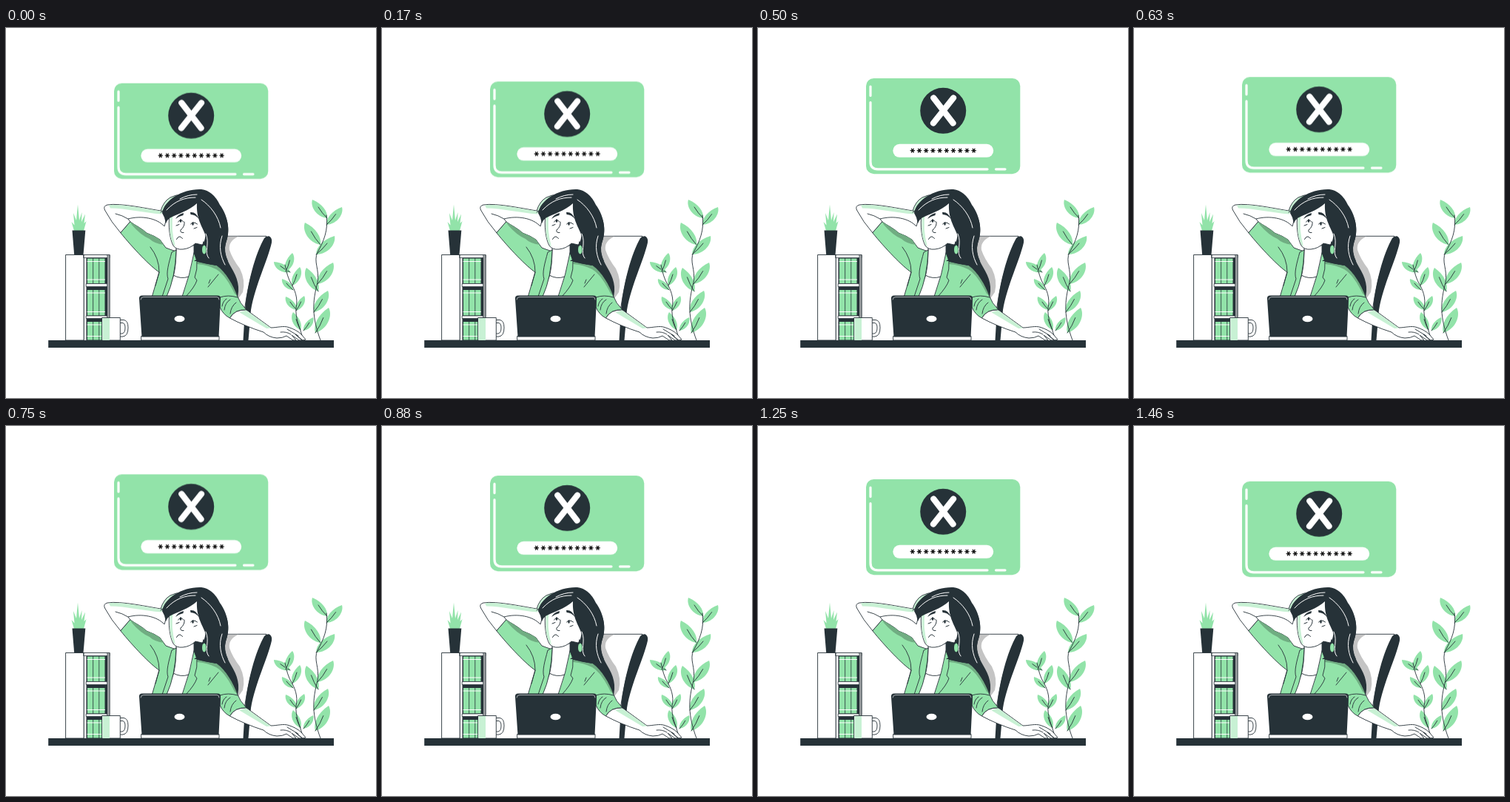
An HTML page for the animation above (1500 ms loop, 500 by 500 pixels).

```html
<!DOCTYPE html>
<html lang="en">
<head>
<meta charset="utf-8">
<title>Wrong password</title>
<style>
  html, body { margin: 0; width: 100%; height: 100%; overflow: hidden; background: #fff; }
  svg { display: block; width: 100%; height: 100%; }
  .g { fill: #92e3a9; }
  .d { fill: #263238; }
  .w { fill: #fff; }
  .t { fill: #c8f1d4; }
  .s { fill: #70ad82; }
  .o { stroke: #263238; stroke-width: .9; stroke-linejoin: round; stroke-linecap: round; }
  .l { fill: none; stroke: #263238; stroke-width: .9; stroke-linecap: round; stroke-linejoin: round; }
  .h { fill: none; stroke: #fff; stroke-width: 1; stroke-linecap: round; }
  .c { fill: none; stroke: #fff; stroke-width: 3.2; stroke-linecap: round; }
</style>
</head>
<body>
<svg viewBox="0 0 500 500" xmlns="http://www.w3.org/2000/svg">
  <g id="card">
    <rect class="g" x="146" y="75" width="208.3" height="129.2" rx="10.5"/>
    <path class="c" d="M152 86V98.500M152 107.500V188Q152 197.800 162 197.800H310M321.500 197.800H334"/>
    <circle class="d" cx="250.200" cy="118.800" r="31"/>
    <path class="c" style="stroke-width:8.200" d="M237.300 101.500L263.500 135.500M264 101.500L237 135.500"/>
    <rect class="w" x="182.300" y="163.800" width="135.900" height="18" rx="9"/>
    <path id="stars" class="l" style="stroke-width:1.400;stroke:#111"/>
  </g>

  <g id="chair">
    <path class="w o" d="M296 281.300H352C346 292 335 318 329 345Q325 362 322 382H300Z"/>
    <path fill="#c4c4c4" d="M296 281.700H314Q300 288 302 300Q306 312 316 325Q324 341 320 357L313 367L296 330Z"/>
    <path class="d" d="M349 284Q352 280.800 356 281.500Q360 284 359 290C354 313 337 347 331 381L327.500 422H320.500L323 381C326 345 337 305 349 284Z"/>
  </g>

  <g id="plants"></g>

  <g id="shelf">
    <rect class="w o" x="81" y="306.500" width="59" height="115.500"/>
    <rect class="d" x="105" y="307" width="33" height="115"/>
    <path class="w" d="M105.500 307H108.500V422H105.500Z"/>
    <g id="books"></g>
    <path class="w o" d="M105 306.500H140V310.500H105ZM108.500 345.500H137V349.500H108.500ZM108.500 389H137V392.500H108.500Z" style="stroke-width:.7"/>
    <path fill="#9b9fa1" class="o" d="M137 306.500H140V422H137Z" style="stroke-width:.6"/>
    <path class="l" d="M105.200 307V422"/>
    <path class="g" d="M92 274L88.500 262L92.500 266.500L91 250L95 260L97 238.500L99 260L102.500 249L102 262L107 251.500L105.500 264L108.500 261L105 274Z"/>
    <path class="d" d="M89.500 273.500H107.300L104.500 306.500H92.200Z"/>
    <path class="w o" d="M153 394.500H159Q165 395 165 405Q165 416 158 417H153V413H157Q161 412 161 405Q161 398.500 157 398.500H153Z"/>
    <path class="w o" d="M130 391.500H154.300V422H130Z"/>
    <path class="t" d="M130.500 392H140V422H130.500Z"/>
  </g>

  <g id="woman">
    <path class="d" d="M252 238L290 242C303 262 302 277 297 291C294 301 297 311 304 323C313 338 317 350 312 368C303 356 298 338 285 322L252 315Z"/>

    <path class="t o" d="M209 247Q213 234 222 229Q230 224.500 238 226L222 248Z"/>
    <path class="w o" d="M212 247.500C192 244.500 155 236 137 239Q131 240.500 133.500 246Q142 262 155 277L168 262L165 258C183 253 204 257 214 268L220 247Z"/>
    <path class="t" d="M139 239.500C157 237 192 245 212 248L210 251.500C187 250 162 243.500 141 243.500Z"/>
    <path class="l" d="M148 251Q157 253 165 258M209 249Q215 246 219 243"/>

    <path class="g o" d="M168 262C175 267 184 271 190 277Q201 281 208 286L216 297Q221 299 230 302L254 304L255 315Q270 319 285 321C298 331 307 348 312 361Q316 372 325 381Q309 380 302.500 392Q293 387 289 377V364H197L207 330C195 322 172 298 155 277Z"/>
    <path class="s" d="M168 262C175 267 184 271 190 277Q201 281 208 286L213 293Q200 291 194 285Q182 280 170 266Z"/>
    <path class="s" d="M256 315.500Q270 319 285 321.500C298 331 307 348 312 361L309 359C302 345 295 333 284 326Q272 320 258 319Z"/>
    <path class="l" d="M195 296Q207 311 207 330L202 348M287 333L273 350M276 340L274 345M289 364Q300 360 313 364M295 381Q296 371 303 367M303 386Q304 376 311 371M292 376Q293 369 298 366"/>

    <path class="w o" d="M230 297C230 312 229 325 226 336L216 363H240Q249 347 254 313V294Z"/>
    <path class="l" d="M226 334Q236 340 247 336"/>
    <path class="g o" d="M230 300L224 303C220 318 216 331 219 339L211 363H217Q229 337 230 300Z"/>
    <path class="g o" d="M254 304Q249 333 238 363H243Q255 350 258 341L255 337Q259 326 258 315Z"/>

    <path class="w o" d="M221 251C219 267 221 285 226 294Q230 300 239 299Q249 298 256 291L265 293Q270 288 270 278L260 235Z"/>
    <path class="t" d="M221.500 252L226 250Q222 270 229 296Q223 290 221.500 277Z"/>
    <path class="l" d="M241 262Q242 268 236 273Q235 277 240 276.500M230.500 285.500Q234 278.500 238.500 284.500M232.500 262Q236 257.500 239.500 261.500M249.500 265Q253 260.500 258.500 265M230 267L234 265.500M254 271L258 269.500" style="stroke-width:1"/>
    <path class="d" d="M229 258Q232 252 240 250L239.500 253Q233 254.500 229 258ZM249 249Q257 248 260.500 258Q256 252 249.500 252Z"/>
    <ellipse class="d" cx="236" cy="260.500" rx="1.300" ry="2.200"/>
    <ellipse class="d" cx="252.500" cy="264.500" rx="1.300" ry="2.200"/>

    <path class="d" d="M211 250C214 232 239 217 264 218Q280 220 289 239C301 255 303 276 297 291Q294 302 300 315L254 315Q264 309 267 300Q271 291 270 281C264 266 257 257 258 237C247 247 232 251 221 257Q217 260 216 264L214 256Z"/>
    <path class="h" d="M217 246C229 233 242 229 256 229M235 231Q246 225 258 225M264 232C276 240 287 254 290 270M270 278C276 291 267 303 274 311M292 281C287 295 290 309 296 320"/>
    <ellipse class="g" cx="267.800" cy="299.500" rx="2.800" ry="6"/>
    <path class="l" d="M266.500 289V294"/>

    <path class="w o" d="M325 381L358 405C366 405 375 402 382 404.500Q393 408 399 414L405 421L401 422L391 414L400 422H396L386 415L392 422H388L379 416Q374 419 366 419Q355 418 348 411Q323 403 302.500 392Q309 380 325 381Z"/>
    <path class="t" d="M324.500 381.500L358 405.500L352 406L315 384Z"/>
    <path class="l" d="M371 411Q379 410 385 414M380 407L395 416"/>
  </g>

  <g id="laptop">
    <path class="w o" d="M183 416.500H288V422H183Z"/>
    <path class="d" d="M184 361.500H286Q290.500 361.500 290 366L287.500 417.500H183.500L180 366Q179.500 361.500 184 361.500Z"/>
    <path class="h" style="stroke-width:.6" d="M182 367Q182 363.500 186 363.500H285Q288 363.500 288 367"/>
    <ellipse class="w" cx="234.500" cy="393" rx="7" ry="4.300"/>
  </g>
  <rect class="d" x="57.200" y="422" width="385.800" height="10"/>
</svg>

<script>
const byId = id => document.getElementById(id);

function add(parent, d, cls) {
  const path = document.createElementNS("http://www.w3.org/2000/svg", "path");
  path.setAttribute("d", d);
  path.setAttribute("class", cls);
  parent.append(path);
}

// Masked password: ten six-armed stars
let stars = "";
for (let i = 0; i < 10; i++) {
  for (let a = 0; a < 3; a++) {
    const dx = 2.7 * Math.cos(a * Math.PI / 3);
    const dy = 2.7 * Math.sin(a * Math.PI / 3);
    stars += `M${208.8 + i * 9.2 - dx} ${172.6 - dy}l${2 * dx} ${2 * dy}`;
  }
}
byId("stars").setAttribute("d", stars);

// Rows of books: top, height
for (const [top, height] of [[311.5, 33.5], [354, 34.5], [397, 24.5]]) {
  for (let i = 0; i < 3; i++) {
    const x = 110 + i * 8.1;
    add(byId("books"), `M${x} ${top}h7.300v${height}h-7.300z`, "g");
    add(byId("books"), `M${x} ${top + 4}h7.300M${x} ${top + height - 5}h7.300`, "h");
  }
}

// Leaf from tip to base, side sets which edge bulges more
function leaf([tx, ty, bx, by]) {
  const dx = bx - tx, dy = by - ty;
  const at = (along, out) => `${tx + dx * along - dy * out} ${ty + dy * along + dx * out}`;
  const side = dx > 0 ? 1 : -1;
  add(byId("plants"),
    `M${tx} ${ty}C${at(.15, .24 * side)} ${at(.65, .34 * side)} ${bx} ${by}` +
    `C${at(.8, -.2 * side)} ${at(.4, -.22 * side)} ${tx} ${ty}Z`, "g");
  add(byId("plants"), `M${bx} ${by}Q${at(.7, .04 * side)} ${at(.4, 0)}`, "l");
}

[
  [414, 232, 434, 257], [454, 242, 433, 266], [404, 263, 425, 293], [444, 281, 419, 306],
  [406, 324, 422, 356], [442, 317, 421, 346], [435, 355, 416, 384], [436, 378, 418, 412],
  [362, 316, 384, 330], [387, 304, 378, 329], [373, 339, 388, 354], [397, 323, 387, 348],
  [378, 363, 393, 381], [403, 362, 392, 382], [388, 384, 398, 408], [415, 391, 402, 409]
].forEach(leaf);

add(byId("plants"), "M425 422C413 390 414 370 421 344C424 326 415 316 421 303C429 289 436 273 433 253", "l");
add(byId("plants"), "M402 422C396 401 391 393 392 378C395 365 390 353 385 345Q380 336 377 320", "l");

byId("card").animate(
  [{ transform: "translateY(0)" }, { transform: "translateY(-10px)" }],
  { duration: 750, delay: -25, direction: "alternate", iterations: Infinity }
);
</script>
</body>
</html>
```
